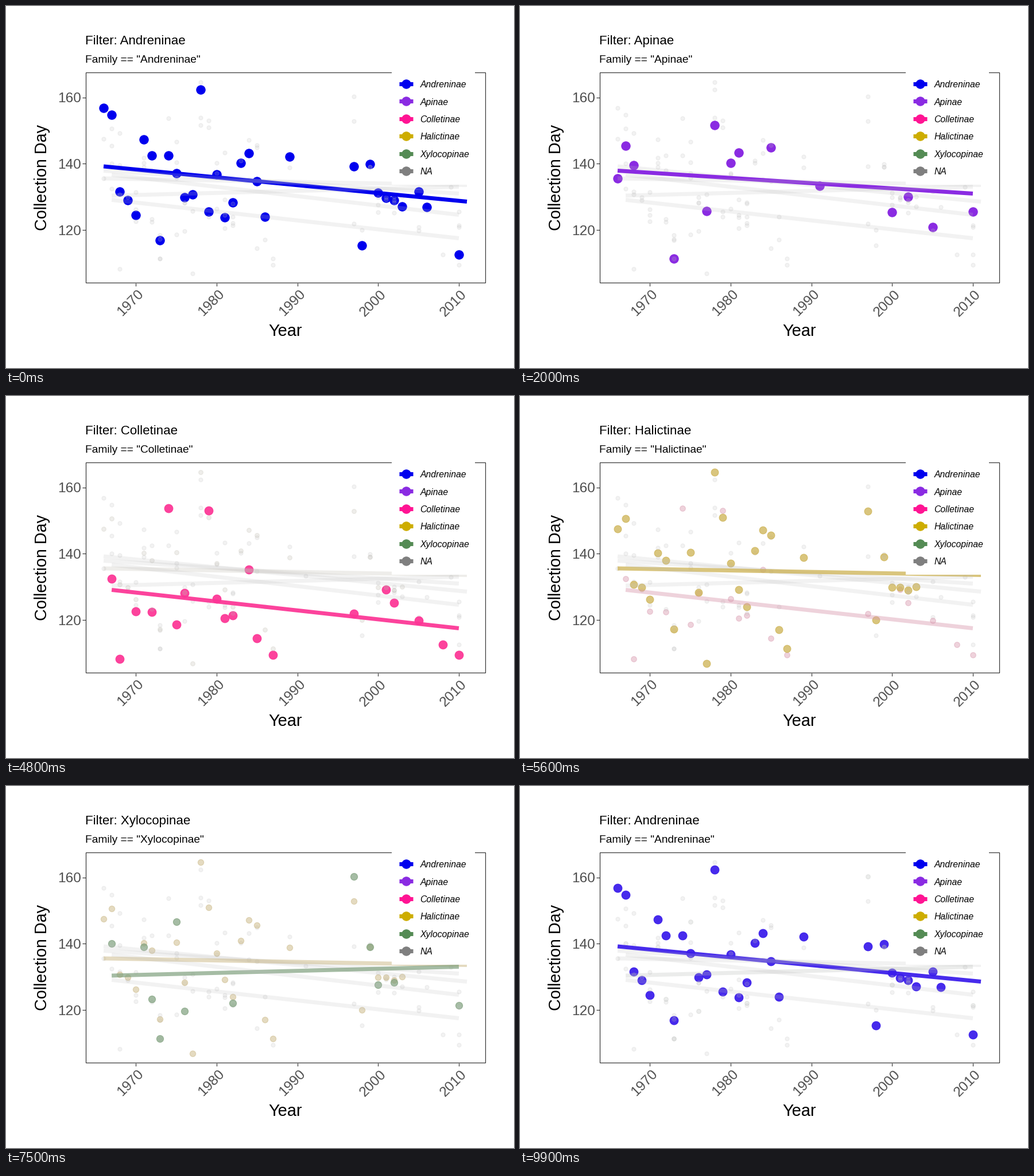
These frames come from a looping animation (885x632 px, 10 s). A matplotlib script:

```python
import numpy as np
import matplotlib.pyplot as plt
from matplotlib.animation import FuncAnimation
from matplotlib.colors import to_rgb
from matplotlib.patches import Rectangle

WIDTH, HEIGHT, DPI = 885, 632, 64
PX = 72 / DPI  # points per pixel
FRAMES, INTERVAL, HOLD = 100, 100, 20
LEFT, RIGHT, TOP, BOTTOM = 138.5, 834.5, 116.3, 483.5
GREY, GREY_ALPHA = "#BEBEBE", 0.2
SMALL, LARGE, STROKE = 3.5, 7.6, 1.2

# Family: colour, fit line (year, y, year, y), points {year: y}; y in pixels.
FAMILIES = {
    "Andreninae": ("#0000EE", (1966, 280, 2011, 341.5), {
        1966: 178, 1967: 190, 1968: 323.5, 1969: 339, 1970: 364.5, 1971: 233,
        1972: 261, 1973: 408.5, 1974: 261, 1975: 291.5, 1976: 334, 1977: 329,
        1978: 146, 1979: 358.5, 1980: 294, 1981: 368.5, 1982: 342.5, 1983: 274,
        1984: 257, 1985: 306, 1986: 367.5, 1989: 262.5, 1997: 280, 1998: 418,
        1999: 276, 2000: 326, 2001: 335, 2002: 338.5, 2003: 349.5, 2005: 324,
        2006: 351, 2010: 433.5}),
    "Apinae": ("#8A2BE2", (1966, 287.5, 2010, 327.5), {
        1966: 301, 1967: 243.5, 1968: 278, 1973: 441, 1977: 358, 1978: 208,
        1980: 274, 1981: 256, 1985: 246.5, 1991: 314, 2000: 360, 2002: 333,
        2005: 386, 2010: 359}),
    "Colletinae": ("#FF1493", (1967, 338.5, 2010, 405.5), {
        1967: 318.5, 1968: 459, 1970: 376, 1972: 376.5, 1974: 196, 1975: 399,
        1976: 344, 1979: 199.5, 1980: 353.5, 1981: 388, 1982: 382.5, 1984: 303,
        1985: 423, 1987: 451.5, 1997: 379.5, 2001: 338, 2002: 361, 2005: 391.5,
        2008: 434, 2010: 451.5}),
    "Halictinae": ("#CDAD00", (1966, 301, 2011, 312.5), {
        1966: 232, 1967: 214, 1968: 328.5, 1969: 333.5, 1970: 354.5, 1971: 273.5,
        1972: 287, 1973: 406.5, 1975: 272.5, 1976: 342.5, 1977: 467, 1978: 133,
        1979: 212, 1980: 292, 1981: 338, 1982: 367.5, 1983: 270, 1984: 234,
        1985: 243, 1986: 407.5, 1987: 440.5, 1989: 282, 1997: 201, 1998: 391,
        1999: 281, 2000: 333.5, 2001: 333.5, 2002: 339, 2003: 332.5}),
    "Xylocopinae": ("#548B54", (1967, 331, 2010, 315.5), {
        1967: 275, 1971: 280.5, 1972: 372, 1973: 440.5, 1975: 237, 1976: 393,
        1982: 379, 1997: 158, 1999: 281, 2000: 346.5, 2002: 342.5, 2010: 383}),
    "NA": ("#7F7F7F", (1967, 294.5, 2010, 364.5), {
        1968: 222, 1970: 325, 1971: 265, 1973: 400, 1975: 300, 1978: 195,
        1979: 368, 1981: 364.5, 1982: 345, 2009: 316, 2010: 386}),
}
STATES = [name for name in FAMILIES if name != "NA"]

TO_XYZ = np.array([[0.4124, 0.3576, 0.1805],
                   [0.2126, 0.7152, 0.0722],
                   [0.0193, 0.1192, 0.9505]])
WHITE = TO_XYZ.sum(axis=1)
TO_LAB = np.array([[0, 116, 0], [500, -500, 0], [0, 200, -200]])


def rgb_to_lab(color):
    c = np.array(to_rgb(color))
    linear = np.where(c > 0.04045, ((c + 0.055) / 1.055) ** 2.4, c / 12.92)
    xyz = TO_XYZ @ linear / WHITE
    f = np.where(xyz > 0.008856, np.cbrt(xyz), 7.787 * xyz + 16 / 116)
    return TO_LAB @ f - [16, 0, 0]


def lab_to_rgb(lab):
    f = np.linalg.solve(TO_LAB, lab + np.array([16, 0, 0]))
    xyz = np.where(f > 0.2069, f ** 3, (f - 16 / 116) / 7.787)
    linear = np.clip(np.linalg.solve(TO_XYZ, xyz * WHITE), 0, 1)
    return np.clip(np.where(linear > 0.0031308,
                            1.055 * linear ** (1 / 2.4) - 0.055,
                            12.92 * linear), 0, 1)


def blend(color, amount):
    """Faded grey at 0, the full opaque colour at 1, mixed in Lab."""
    lab = (1 - amount) * rgb_to_lab(GREY) + amount * rgb_to_lab(color)
    return (*lab_to_rgb(lab), GREY_ALPHA + (1 - GREY_ALPHA) * amount)


def year_x(year):
    return 226.3 + 14.065 * (np.asarray(year) - 1970)


def day_y(day):
    return 391.3 - 5.795 * (day - 120)


def marker_area(radius):
    return (2 * radius * PX) ** 2


plt.rcParams["font.family"] = "Liberation Sans"
fig = plt.figure(figsize=(WIDTH / DPI, HEIGHT / DPI), dpi=DPI, facecolor="white")
ax = fig.add_axes([0, 0, 1, 1])
ax.set(xlim=(0, WIDTH), ylim=(HEIGHT, 0))
ax.axis("off")


def label(x, y, text, size, color="black", **kwargs):
    kwargs.setdefault("va", "baseline")
    return ax.text(x, y, text, fontsize=size * PX, color=color, zorder=6, **kwargs)


def stroke(xs, ys, color, width, zorder):
    return ax.plot(xs, ys, color=color, lw=width * PX, zorder=zorder,
                   solid_capstyle="butt")[0]


def draw_frame():
    ax.add_patch(Rectangle((LEFT, TOP), RIGHT - LEFT, BOTTOM - TOP, fill=False,
                           ec="#333333", lw=1.2 * PX, zorder=4))
    for day in (120, 140, 160):
        y = day_y(day)
        stroke([LEFT - 5.5, LEFT], [y, y], "#333333", 1.2, 4)
        label(130.5, y + 9, str(day), 24.4, "#4D4D4D", ha="right")
    for year in range(1970, 2011, 10):
        x = float(year_x(year))
        stroke([x, x], [BOTTOM, BOTTOM + 5.5], "#333333", 1.2, 4)
        label(x - 8.7, 519, str(year), 24.4, "#4D4D4D", rotation=45,
              ha="center", va="center")
    label(486.5, 575.5, "Year", 29, ha="center")
    label(72, 299.5, "Collection Day", 28.8, rotation=90,
          ha="right", va="center", rotation_mode="default").set_x(77.5)


def draw_legend():
    ax.add_patch(Rectangle((672, 100), 145, 212, fc="white", ec="none", zorder=5))
    for i, (name, (color, _, _)) in enumerate(FAMILIES.items()):
        y = 136 + 30.4 * i
        stroke([684.5, 709], [y, y], color, 7, 6)
        ax.scatter([697], [y], s=marker_area(LARGE), color=color,
                   linewidths=STROKE * PX, zorder=6)
        label(721.5, y + 6.2, name, 15.7, style="italic")


draw_frame()
draw_legend()
title = label(138.3, 67, "", 22.3)
subtitle = label(138.3, 98.7, "", 19.1)
dots, fits = {}, {}
for name, (color, (x0, y0, x1, y1), points) in FAMILIES.items():
    dots[name] = ax.scatter(year_x(list(points)), list(points.values()), zorder=2,
                            linewidths=STROKE * PX)
    fits[name] = stroke(year_x([x0, x1]), [y0, y1], GREY, 7, 3)


def timeline(frame):
    """Current state, next state and progress between them."""
    index, step = divmod(frame, HOLD)
    still = 6 if index == 0 else 7
    progress = max(0, step - still) / (HOLD - still)
    return STATES[index], STATES[(index + 1) % len(STATES)], progress


def update(frame):
    current, following, t = timeline(frame)
    presence = {current: 1 - t, following: t}
    for name, (color, _, _) in FAMILIES.items():
        amount = presence.get(name, 0)
        rgba = blend(color, amount)
        dots[name].set_color([rgba])
        dots[name].set_sizes([marker_area(SMALL + (LARGE - SMALL) * amount)])
        fits[name].set_color(rgba)
    shown = current if t < 0.5 else following
    title.set_text(f"Filter: {shown}")
    subtitle.set_text(f'Family == "{shown}"')
    return [*dots.values(), *fits.values(), title, subtitle]


animation = FuncAnimation(fig, update, frames=FRAMES, interval=INTERVAL,
                          repeat=True, repeat_delay=0, blit=False)
plt.show()
```
